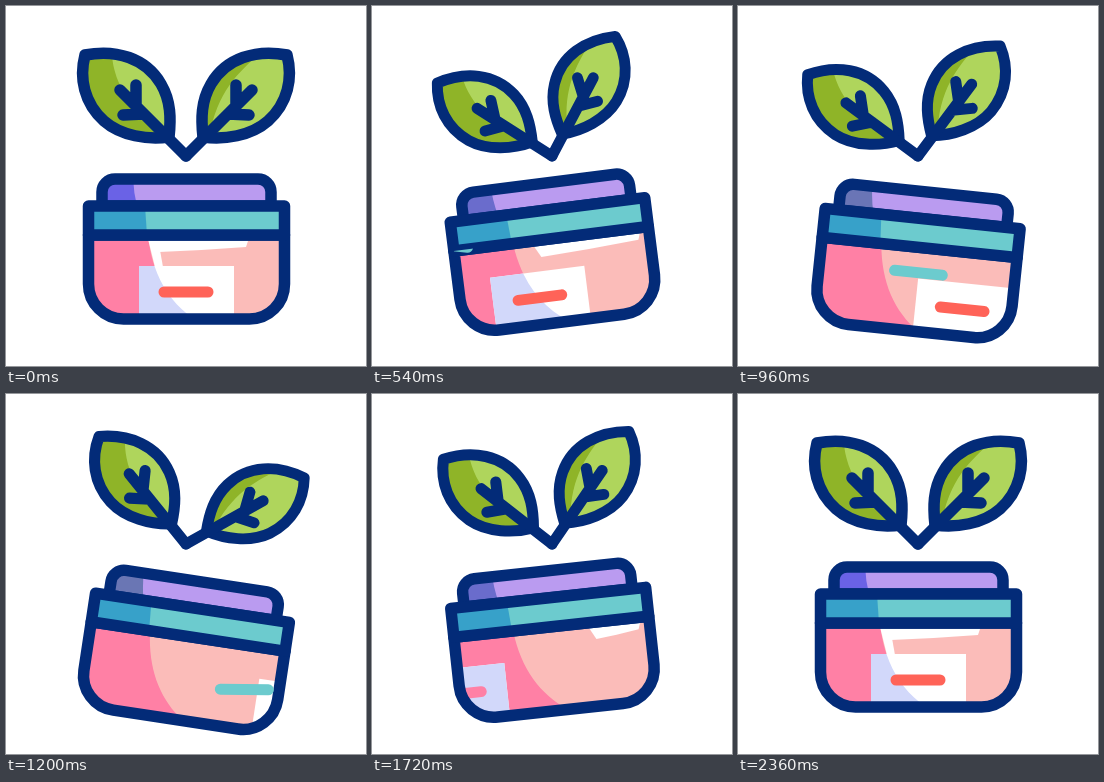
These frames come from a looping animation (360x360 px, 2400 ms). An HTML page with a canvas:

```html
<!DOCTYPE html>
<html lang="en">
<head>
<meta charset="utf-8">
<title>Cream jar with leaves</title>
<style>
html, body { margin: 0; width: 100%; height: 100%; overflow: hidden; background: #fff; }
canvas { display: block; width: 360px; height: 360px; }
</style>
</head>
<body>
<canvas id="stage" width="360" height="360"></canvas>
<script>
const c = document.getElementById('stage').getContext('2d');
const LOOP = 2400, STEP = 20, START = 220, END = 2040;
const NAVY = '#032b78', PINK = '#ff80a5', TEAL = '#6ccbce';
const { sin, cos, tanh, abs, floor, min, max, PI } = Math;

const leaf = new Path2D('M79 49C110 43 140 52 155 78C165 95 165 113 163 131C142 134 115 130 98 115C78 97 73 72 79 49Z');
const veins = new Path2D('M180 150L114 84M130 79V100M117 109L138 108');
const leftShade = new Path2D('M60 30H106C102 72 122 106 165 127V150H60Z');
const rightShade = new Path2D('M98 40C122 62 148 80 157 132H200V20H98Z');
const lid = new Path2D('M96 200V186A13 13 0 0 1 109 173H252A13 13 0 0 1 265 186V200Z');
const lidShade = new Path2D('M90 167H127Q127 184 131 200H90Z');
const band = new Path2D('M82.5 200H278.5V229H82.5Z');
const bandShade = new Path2D('M82 200H139L141 229H82Z');
const body = new Path2D('M82.5 229H278.5V278A35 35 0 0 1 243.5 313H117.5A35 35 0 0 1 82.5 278Z');
const bodyShade = new Path2D('M82 229H142C146 268 162 295 188 313H82Z');
const paper = new Path2D('M133 260H228V308H133Z');
const paperLine = new Path2D('M158 286H202');

// Smooth rise from 0 to 1 between two times.
function ease(t, from, to) {
  const p = max(0, min(1, (t - from) / (to - from)));
  return (1 - cos(PI * p)) / 2;
}

// Share of the jar's swing that has passed.
const progress = t => max(0, min(1, (t - START) / (END - START)));

// Three alternating, shrinking swings, then rest.
function swing(t, first, decay) {
  const beat = 515;
  const peak = k => k > 0 && k < 4 ? first * (-decay) ** (k - 1) : 0;
  const k = floor((t - START) / beat), from = START + k * beat;
  return peak(k) + (peak(k + 1) - peak(k)) * ease(t, from, from + beat);
}

// The label backs up, leaves on the right and returns from the left.
function labelShift(t) {
  return t < 1400
    ? 168 * ease(t, 620, 1400) - 18 * ease(t, START, 500)
    : -150 * (1 - ease(t, 1400, 2200));
}

function fill(path, color) {
  c.fillStyle = color;
  c.fill(path);
}

function line(path, color = NAVY, width = 11.5) {
  c.strokeStyle = color;
  c.lineWidth = width;
  c.stroke(path);
}

function within(path, draw) {
  c.save();
  c.clip(path);
  draw();
  c.restore();
}

function turned(x, y, degrees, scale, draw) {
  c.save();
  c.translate(x, y);
  c.rotate(degrees * PI / 180);
  c.scale(scale, abs(scale));
  c.translate(-x, -y);
  draw();
  c.restore();
}

// A leaf shrinks a little as it bends; side -1 mirrors it.
function drawLeaf(angle, side, shade) {
  const size = 1 - 0.055 * tanh(abs(angle) / 9);
  turned(180, 150, angle, side * size, () => {
    fill(leaf, '#afd55c');
    within(leaf, () => fill(shade, '#8fb428'));
    line(leaf);
    line(veins);
  });
}

function drawGloss(t) {
  const l = 147 + 133 * (ease(t, 500, 680) - ease(t, 1500, 1960));
  const r = 244 + 27 * (ease(t, START, 340) - ease(t, 2040, 2300));
  if (l >= r) return;
  fill(new Path2D(`M${l - 3} 229H${r}L${r - 4} 241L${(l + r) / 2} 244L${l + 6} 246Z`), '#fff');
  if (l < 150) fill(new Path2D('M142 233H152L157 261H149Z'), '#fff');
}

function drawLabel(t) {
  const shift = labelShift(t);
  c.save();
  c.translate(shift, 0);
  fill(paper, '#fff');
  within(paper, () => {
    c.translate(-shift, 0);
    fill(bodyShade, '#d2d8fa');
  });
  line(paperLine, shift < -40 ? PINK : '#ff6358', 11);
  c.restore();
}

// A teal dash crosses the jar from left to right.
function drawDash(t) {
  const p = (t - 740) / 460;
  const x = 125 + 119 * p, y = 237 + 36 * p;
  turned(x, y, 7 - 15 * p, 1, () =>
    line(new Path2D(`M${x - 24} ${y}H${x + 24}`), TEAL, 11));
}

function drawJar(t) {
  const u = progress(t), hump = sin(PI * u);
  const tilt = 3 * u * hump - 7.5 * sin(3 * PI * u);
  c.save();
  c.translate(0, 13.5 * hump ** 2);
  turned(180, 240, tilt, 1, () => {
    fill(lid, '#ba9bf0');
    within(lid, () => fill(lidShade, `rgb(106, ${98 + 20 * hump}, ${230 - 50 * hump})`));
    line(lid);

    fill(body, '#fbbcb9');
    within(body, () => {
      fill(bodyShade, PINK);
      drawGloss(t);
      drawLabel(t);
    });
    line(body);

    fill(band, TEAL);
    fill(bandShade, '#37a1c9');
    line(band);
    within(body, () => drawDash(t));
  });
  c.restore();
}

function draw(t) {
  c.clearRect(0, 0, 360, 360);
  c.lineCap = c.lineJoin = 'round';
  drawLeaf(swing(t, -16, 0.6) - 3 * sin(PI * progress(t)), 1, leftShade);
  drawLeaf(swing(t, -25, 0.67), -1, rightShade);
  drawJar(t);
}

const begin = performance.now();
function frame() {
  const time = (performance.now() - begin) % LOOP;
  draw(floor(time / STEP) * STEP);
  requestAnimationFrame(frame);
}
frame();
</script>
</body>
</html>
```
